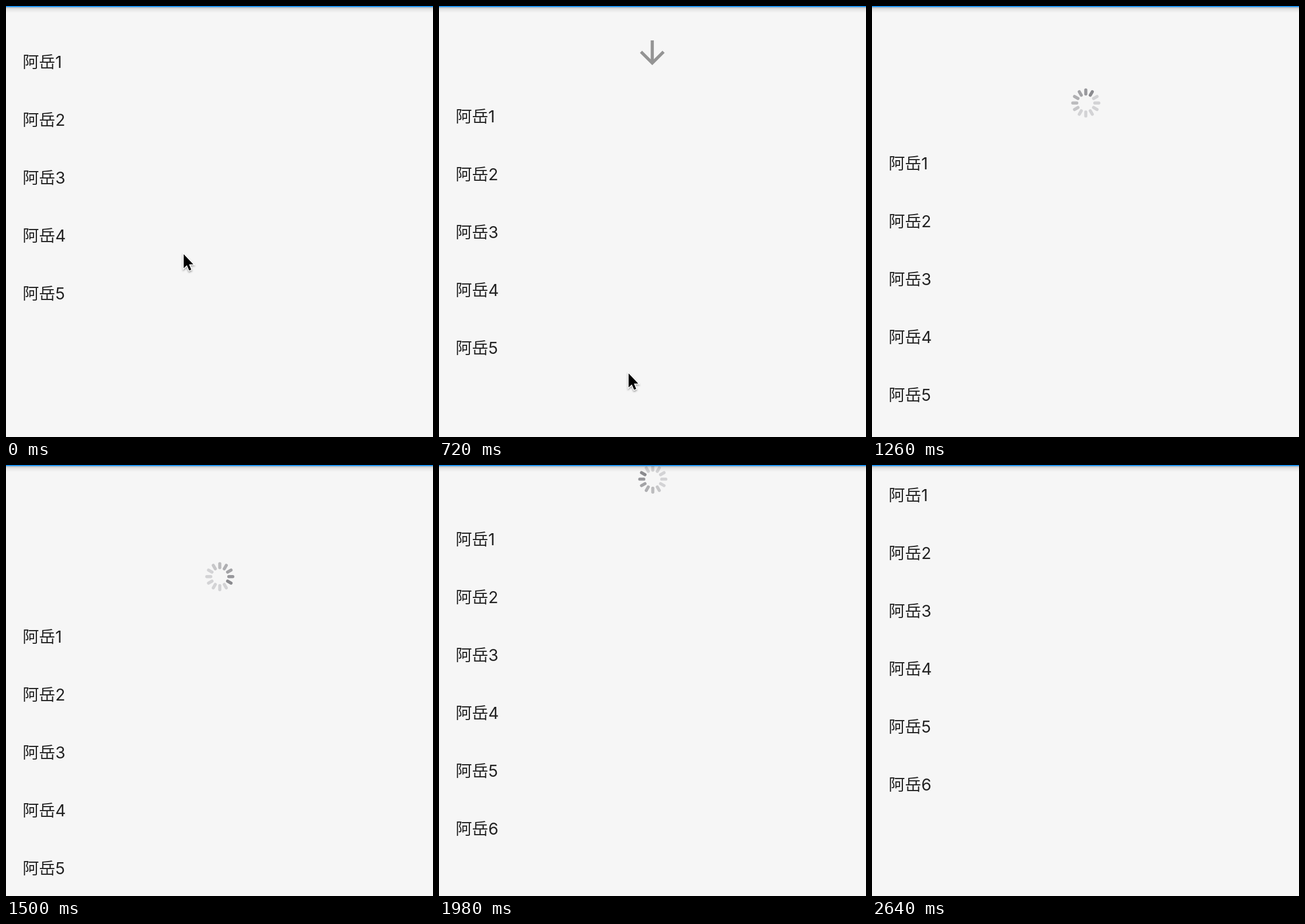
An HTML page that plays this animation: 745 px wide and 752 px high, repeating every 3.42 s.

```html
<!DOCTYPE html>
<html lang="zh-CN">
<head>
<meta charset="utf-8">
<title>Pull to refresh</title>
<style>
  html, body { margin: 0; width: 100%; height: 100%; overflow: hidden; background: #f6f6f6; }
  svg { display: block; width: 745px; height: 752px; }
  text { font: 28.5px Inter, "Noto Sans CJK SC", "Noto Sans CJK", sans-serif; fill: #222; }
  #spinner line { stroke: #3c3c44; stroke-width: 5.4; stroke-linecap: round; }
  #cursor { filter: drop-shadow(0 2px 1.5px rgba(0, 0, 0, .35)); }
</style>
</head>
<body>
<svg viewBox="0 0 745 752">
  <defs>
    <linearGradient id="shade" x2="0" y2="1">
      <stop offset="0" stop-opacity=".22"/>
      <stop offset=".4" stop-opacity=".07"/>
      <stop offset="1" stop-opacity="0"/>
    </linearGradient>
  </defs>
  <rect width="745" height="752" fill="#f6f6f6"/>
  <g id="list"></g>
  <g id="arrow">
    <path transform="translate(339.7 -10.8) scale(2.7)" fill="#808080"
      d="M20 12l-1.41-1.41L13 16.17V4h-2v12.17l-5.59-5.58L4 12l8 8z"/>
  </g>
  <g id="spinner"></g>
  <rect y="2" width="745" height="10" fill="url(#shade)"/>
  <rect width="745" height="2" fill="#2196f3"/>
  <g id="cursor">
    <path d="M0 0V24.5L5.6 19.2L9.6 28.4L13.2 26.9L9.3 17.7H16.8Z"
      stroke="#fff" stroke-width="3" paint-order="stroke"/>
  </g>
</svg>
<script>
const LOOP = 3420, STEP = 60;
const ROWS = 6, PITCH = 101;
const SPIN = 1080, RELEASE = 1680, LOADED = 1860;

// [time, list offset] where the finger changes speed
const DRAG = [[0, 45], [300, 91], [720, 140], [1080, 203], [RELEASE, 267]];

const $ = id => document.getElementById(id);
const move = (el, x, y) => el.setAttribute('transform', `translate(${x} ${y})`);
const show = (el, on) => el.setAttribute('visibility', on ? 'visible' : 'hidden');

function add(parent, tag, attrs) {
  const el = document.createElementNS('http://www.w3.org/2000/svg', tag);
  for (const key in attrs) el.setAttribute(key, attrs[key]);
  return parent.appendChild(el);
}

function pullAt(t) {
  if (t >= RELEASE) return 267 * Math.exp(-(((t - RELEASE) / 268) ** 1.87));
  const i = DRAG.findIndex(key => key[0] > t);
  const [t0, a] = DRAG[i - 1], [t1, b] = DRAG[i];
  return a + (b - a) * (t - t0) / (t1 - t0);
}

function smooth(lo, hi, v) {
  const u = Math.min(1, Math.max(0, (v - lo) / (hi - lo)));
  return u * u * (3 - 2 * u);
}

const list = $('list'), arrow = $('arrow'), spinner = $('spinner'), cursor = $('cursor');

const rows = Array.from({ length: ROWS }, (_, i) => {
  const row = add(list, 'text', { x: 29, y: 62.5 + i * PITCH });
  row.textContent = '阿岳' + (i + 1);
  return row;
});

const ticks = Array.from({ length: 12 }, (_, i) =>
  add(spinner, 'line', { y1: -15.7, y2: -22.7, transform: `rotate(${i * 30})` }));

function draw(t) {
  const pull = pullAt(t);
  move(list, 0, pull);
  show(rows[ROWS - 1], t >= LOADED);

  show(arrow, t < SPIN);
  arrow.setAttribute('opacity', smooth(70, 165, pull));
  move(arrow, 0, 0.94 * pull - 71.5);

  show(spinner, t >= SPIN && pull > 25);
  move(spinner, 373, pull - 53);
  const head = Math.max(12, Math.floor(t * 0.012 - 1.3));
  ticks.forEach((tick, i) => {
    const behind = (head - i + 24) % 12;
    tick.setAttribute('stroke-opacity', Math.max(47, 147 - 16.7 * behind) / 255);
  });

  // The pointer slows slightly on its way down and out
  const drop = 0.3194 * t - 4.23e-5 * t * t;
  show(cursor, t <= SPIN);
  move(cursor, 310 + drop * 0.1, 433 + drop);
}

function tick() {
  draw(Math.floor(performance.now() % LOOP / STEP) * STEP);
  requestAnimationFrame(tick);
}
tick();
</script>
</body>
</html>
```
